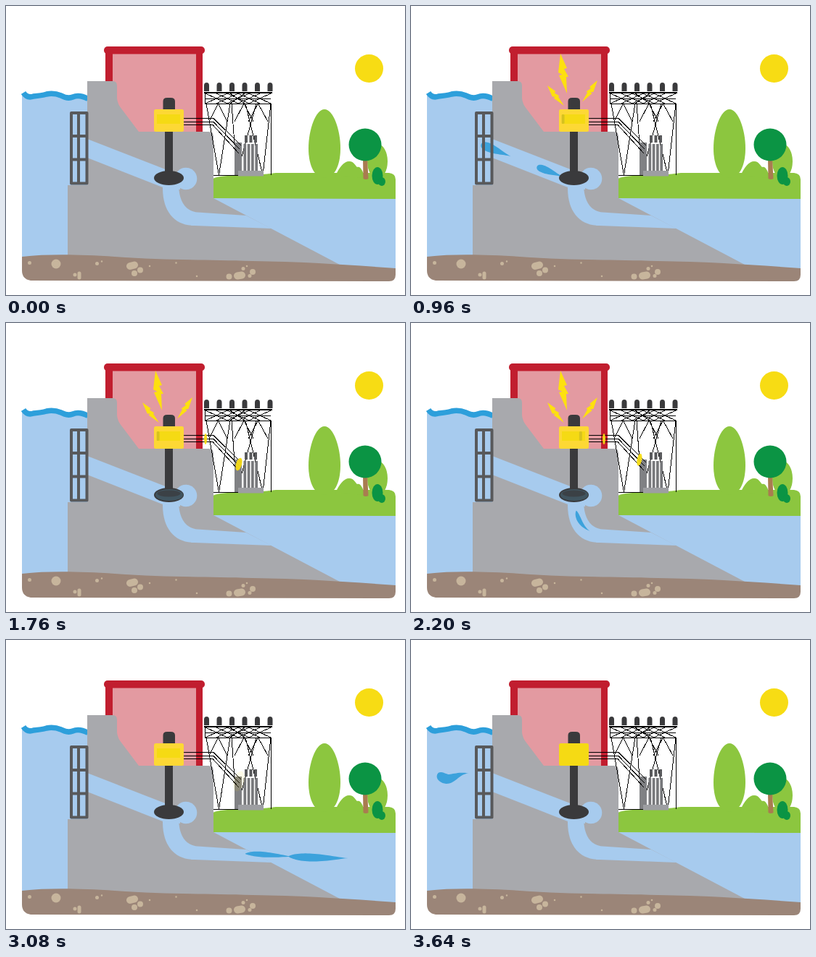
An HTML page that plays this animation: 550x400 px, repeating every 3680 ms.

```html
<!DOCTYPE html>
<html lang="en">
<head>
<meta charset="utf-8">
<title>Hydroelectric dam</title>
<style>
html, body { margin: 0; width: 100%; height: 100%; overflow: hidden; background: #fff; }
svg { display: block; width: 550px; height: 400px; }
.water { fill: #a7cbee; }
.concrete { fill: #a8a9ad; }
.dark { fill: #3a3a3c; }
.red { fill: #c11e2f; }
.grass { fill: #8cc63f; }
.leaf { fill: #0b9444; }
.line { fill: none; stroke: #000; shape-rendering: crispEdges; }
.bars { fill: none; stroke: #58595b; stroke-width: 4; }
.stones { fill: none; stroke: #c7b59c; stroke-linecap: round; }
</style>
</head>
<body>
<svg viewBox="0 0 550 400">
  <defs>
    <path id="inflow" d="M23 186C40 180 42 197 56 191C66 187 74 182 84 186L122 202L198 232L222 241"/>
    <path id="outflow" d="M227 246C226 272 238 290 264 294C300 298 330 294 356 297L389 299.500Q430 302 472 302"/>
    <path id="wire" d="M247 160.500H287L321 195.500"/>
    <path id="bolt" d="M0 0L9 20L5 21L11 32L8 32L9 55L-2 30L2.500 29L-3 26z"/>
  </defs>

  <circle cx="500.5" cy="86.5" r="19.5" fill="#f7dc14"/>

  <!-- powerhouse -->
  <rect x="146" y="64" width="117" height="112" fill="#e39aa1"/>
  <path class="red" d="M137 64h10v60h-10zM262 64h9v112h-9z"/>
  <rect class="red" x="135" y="56" width="139" height="10.500" rx="5"/>

  <!-- water and land -->
  <path class="water" d="M22 124H114V352H22zM284 262H537V366H284z"/>
  <path fill="none" stroke="#2d9fdb" stroke-width="7.500" d="M24 120Q29 128 38 125Q49 124 56 122Q66 120 76 124Q85 129 92 126Q101 122 113 128.500"/>
  <path class="grass" d="M285 239C300 232 340 236 372 231H528Q537 232 537 240V267L285 266z"/>
  <path class="grass" d="M439 143C451 143 461 171 461 197C461 222 452 238 439 238C426 238 417 222 417 197C417 171 427 143 439 143z"/>
  <path class="grass" d="M454 236C459 223 466 215 473 215C480 215 482 222 484 223C489 221 493 230 494 238z"/>
  <ellipse class="grass" cx="512" cy="215" rx="14" ry="24"/>
  <path fill="#a97c50" d="M492 210h6l1.500 29q-3.500 2-7 0z"/>
  <circle class="leaf" cx="495" cy="192" r="22.500"/>
  <ellipse class="leaf" cx="512" cy="235" rx="7.500" ry="12"/>
  <ellipse class="leaf" cx="518" cy="243" rx="5" ry="6"/>

  <!-- dam and waterways -->
  <path class="concrete" d="M112 104H147Q153 104 153 110V128Q154 136 159 142L183 174H279Q286 174 286 181V266L460 358L85 352V248H112z"/>
  <path class="water" d="M112 184L240 234V254L216 251L112 210z"/>
  <circle class="water" cx="248" cy="239" r="15.300"/>
  <path class="water" d="M216 244V252C216 284 232 304 260 304L366 308L331 290L264 285.500C247 284 238 270 238 246z"/>
  <path fill="#9b8578" d="M22 347C60 343 100 344 150 347C220 352 270 351 340 353C410 354 470 358 537 363V372Q537 381 528 381L34 380Q22 378 22 366z"/>
  <g class="stones">
    <path stroke-width="2.500" d="M132 353.500h0M198 360h0M234.500 355.500h0M263 374h0M332 360h0"/>
    <path stroke-width="5" d="M32.500 355.500h0M95 372h0M101 370v6M125.500 356.500h0M327 363.500h0M336 373.500h0"/>
    <path stroke-width="8" d="M177 370h0M185 365.500h0M307.500 374.500h0M340 368h0"/>
    <path stroke-width="10" d="M171 360l6-1.500M319 373.500l6-1"/>
    <path stroke-width="13" d="M69 357h0"/>
  </g>

  <g id="drops" fill="#3ca2dc"></g>
  <path class="bars" stroke-linejoin="round" d="M90 148H111.500V245.500H90zM100 148V245M90 180H111M90 212.500H111"/>

  <!-- substation -->
  <path class="line" stroke-width="2" d="M273 119.500H367"/>
  <path id="truss" class="line"/>
  <g id="caps" class="dark"></g>
  <rect x="315" y="189" width="10" height="45" fill="#808184"/>
  <path id="fins" stroke="#77787b" stroke-width="3.700"/>
  <path class="bars" d="M331 179V189M337.500 179V189M344 179V189"/>
  <rect x="320" y="228" width="35" height="7.500" fill="#9d9ea2"/>
  <path class="line" d="M245 155.500H286L324 193M245 160.500H286L322 198M245 164.500H285L321 204"/>
  <g id="sparks" fill="#f7dc14"></g>

  <!-- generator and turbine -->
  <path class="dark" d="M216.500 146V132Q216.500 127 222 127H227Q233 127 233 132V146zM219 172H230V235H219z"/>
  <ellipse class="dark" cx="224.500" cy="238" rx="20.500" ry="10"/>
  <g id="spin">
    <ellipse cx="225" cy="238" rx="19" ry="8" fill="#456a7c" opacity=".55"/>
    <ellipse class="dark" cx="224.500" cy="236" rx="16" ry="4.500" opacity=".7"/>
  </g>
  <rect id="box" x="204" y="143" width="41" height="31" rx="2.500"/>
  <rect x="208" y="150" width="32" height="13" fill="#f5da14"/>
  <rect id="mark" y="150" width="4" height="13" rx="1.500" fill="#8f8a3c"/>
  <g id="bolts" fill="#fde00f">
    <use href="#bolt" transform="translate(206 66)"/>
    <use href="#bolt" transform="translate(188 110) rotate(-30) scale(.65)"/>
    <use href="#bolt" transform="translate(257 103) rotate(26) scale(-.65 .65)"/>
  </g>
</svg>
<script>
const LOOP = 3680;
const $ = id => document.getElementById(id);
const clamp = v => Math.max(0, Math.min(1, v));
const mix = (a, b, k) => a + (b - a) * k;
const swing = v => (1 - Math.cos(Math.PI * clamp(v))) / 2;
const range = (n, f) => Array.from({ length: n }, (_, i) => f(i));

function set(el, attrs) {
  for (const k in attrs) el.setAttribute(k, attrs[k]);
  return el;
}
const add = (parent, tag) =>
  parent.appendChild(document.createElementNS('http://www.w3.org/2000/svg', tag));

// Steel frame: crossed bays above, legs in V pairs with short braces below
const cross = (x, w) => `M${x} 121l${w} 14m0 -14l${-w} 14`;
const leg = (x, w, foot) =>
  `M${x} 135L${foot} 234L${x + w} 135M${x + 4} 160L${x + w / 2} 135L${x + w - 4} 160`;
set($('truss'), {
  d: 'M274.500 120V135H365.500V234M286 234.500H355M275 128.500H365'
    + range(5, i => cross(275 + i * 15, 30)).join('') + cross(309, 20)
    + leg(276, 33, 293.5) + leg(311, 34, 318) + leg(330, 35, 354)
});
range(6, i => {
  const x = 273 + i * 17.5;
  set(add($('caps'), 'path'), { d: `M${x} 118v-8q0 -4 3.500 -4t3.500 4v8z` });
});
set($('fins'), { d: range(4, i => `M${329.3 + i * 5.3} 191v39`).join('') });

// Leaf-shaped ribbon lying on a guide path between two distances
function ribbon(guide, tail, head, width, blunt) {
  const taper = 1.4, peak = blunt / (blunt + taper);
  const shape = s => s ** blunt * (1 - s) ** taper;
  const top = [], low = [], n = 28;
  for (let i = 0; i <= n; i++) {
    const s = (i / n) ** 1.5, at = mix(tail, head, s);
    const p = guide.getPointAtLength(at);
    const a = guide.getPointAtLength(at - 1), b = guide.getPointAtLength(at + 1);
    const h = width / 2 * shape(s) / shape(peak) / (Math.hypot(b.x - a.x, b.y - a.y) || 1);
    const dx = (a.y - b.y) * h, dy = (b.x - a.x) * h;
    top.push(`${p.x + dx} ${p.y + dy}`);
    low.unshift(`${p.x - dx} ${p.y - dy}`);
  }
  return `M${top.concat(low).join('L')}z`;
}

function flowIn(age) {
  const guide = $('inflow'), total = guide.getTotalLength();
  const tail = age * .178, k = tail / total;
  if (age < 0 || k > 1) return '';
  const head = Math.min(total, tail + mix(46, 33, k * k));
  return ribbon(guide, tail, head, mix(14, 9, k) * clamp(age / 75), .45);
}

function flowOut(age) {
  const guide = $('outflow'), total = guide.getTotalLength(), k = age / 1180;
  if (k < 0 || k > 1.09) return '';
  const head = total * mix(clamp(k), swing(k), .75);
  const tail = total * .7 * swing((k - .1) / .9);
  return ribbon(guide, tail, head, 6 + 5 * clamp(k) ** 3, .75);
}

const spawn = (flow, starts) =>
  starts.map(start => ({ flow, start, el: add($('drops'), 'path') }));
const drops = [...spawn(flowIn, [56, 522, 3565]), ...spawn(flowOut, [1900, 2300])];

const sparks = range(3, i => ({ start: 1006 + i * 517, el: add($('sparks'), 'ellipse') }));

// Slides along the wire, then swells and fades at the transformer
function drawSpark({ start, el }, t) {
  const wire = $('wire'), total = wire.getTotalLength();
  const age = t - start, dist = age * .118;
  const p = wire.getPointAtLength(Math.min(total, dist));
  const k = clamp((dist - 40) / (total - 40)) ** 2;
  const fade = clamp((age - total / .118) / 430);
  set(el, {
    rx: mix(mix(2, 4, k), 9, fade),
    ry: mix(mix(7.5, 9, k), 17, fade),
    transform: `translate(${p.x} ${p.y}) rotate(${16 * k})`,
    opacity: age < 0 ? 0 : .95 * (1 - fade) ** 2
  });
}

function draw(t) {
  drops.forEach(({ el, flow, start }) => set(el, { d: flow(t - start) }));
  sparks.forEach(s => drawSpark(s, t));

  const on = t >= 920 && t < 2560;
  set($('bolts'), { opacity: on ? 1 : 0 });
  set($('mark'), { x: 233 - 27 * ((t + 216) % 400) / 400, opacity: on ? .3 : 0 });
  set($('spin'), { opacity: clamp((t - 1040) / 160) * clamp((2640 - t) / 160) });
  set($('box'), { fill: t < 3400 ? '#fdd835' : '#f5da14' });
}

const begin = performance.now();
function tick() {
  draw((performance.now() - begin) % LOOP);
  requestAnimationFrame(tick);
}
draw(0);
requestAnimationFrame(tick);
</script>
</body>
</html>
```
